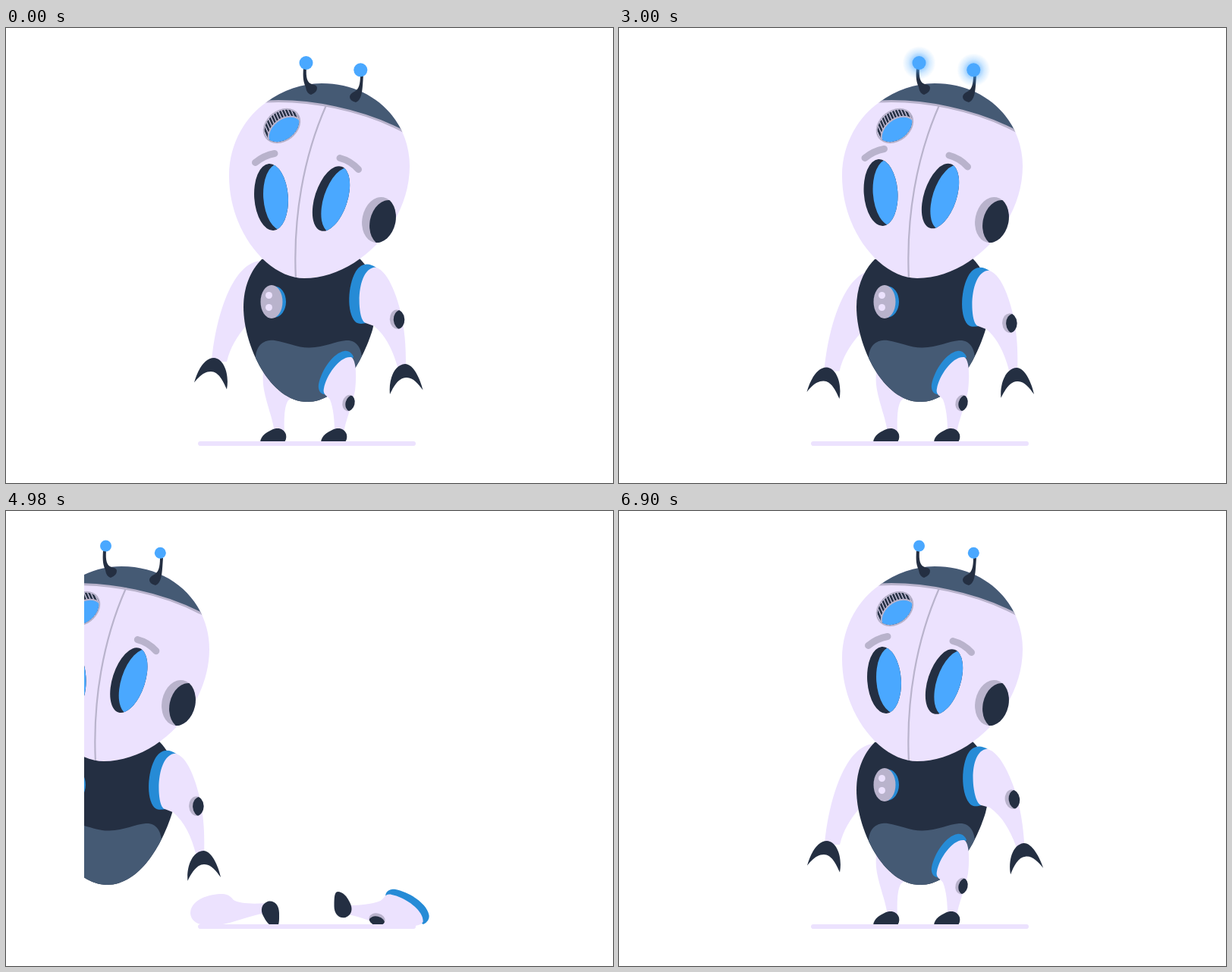
Recreate the animation shown at these times as an HTML page. Size 800 px wide and 600 px high, loop 7200 ms.

```html
<!DOCTYPE html>
<html lang="en">
<head>
<meta charset="utf-8">
<title>Robot</title>
<style>
  html, body { margin: 0; width: 100%; height: 100%; overflow: hidden; background: #fff; }
  svg { display: block; width: 800px; height: 600px; }
  .skin { fill: #ece2fe; }
  .dark { fill: #242f42; }
  .slate { fill: #455a74; }
  .grey { fill: #b9b3cc; }
  .blue { fill: #4aa8ff; }
  .deep { fill: #268bd6; }
  .line { fill: none; stroke: #b9b3cc; stroke-linecap: round; }
  #armR { transform-origin: 470px 350px; }
  #legL { transform-origin: 353px 537px; }
  #legR { transform-origin: 432px 537px; }
</style>
</head>
<body>
<svg viewBox="0 0 800 600">
  <defs>
    <path id="torso" d="M337 305C322 320 313 342 313 368C313 419 348 493 397 493C440 493 470 440 483 398C490 370 493 328 463.500 301.500L400 290Z"/>
    <path id="head" d="M416 73C483 73 532 121 532 182C532 260 462 330 393 330C345 330 294 268 294 195C294 150 318 115 343 98C365 82 390 73 416 73Z"/>
    <ellipse id="port" cx="363.500" cy="129" rx="25" ry="18.500" transform="rotate(-38 363.500 129)"/>
    <ellipse id="lensL" cx="349.500" cy="223" rx="22.300" ry="44" transform="rotate(-4 349.500 223)"/>
    <ellipse id="lensR" cx="428.500" cy="225" rx="21.500" ry="44.500" transform="rotate(18 428.500 225)"/>
    <ellipse id="ear" cx="491.500" cy="253" rx="22" ry="30.300" transform="rotate(12 491.500 253)"/>
    <ellipse id="elbow" cx="515.500" cy="384.300" rx="9.700" ry="12.800" transform="rotate(-4 515.500 384.300)"/>
    <ellipse id="knee" cx="451.500" cy="494.500" rx="8" ry="10.800" transform="rotate(14 451.500 494.500)"/>
    <path id="shoe" class="dark" d="M335 546C336 537 344 533 350 530C358 526 366 528 369 536C371 545 364 551 354 551C344 551 335 551 335 546Z"/>

    <clipPath id="window"><rect x="103" y="0" width="613" height="600"/></clipPath>
    <clipPath id="inTorso"><use href="#torso"/></clipPath>
    <clipPath id="inHead"><use href="#head"/></clipPath>
    <clipPath id="inPort"><use href="#port"/></clipPath>
    <clipPath id="inLensL"><use href="#lensL"/></clipPath>
    <clipPath id="inLensR"><use href="#lensR"/></clipPath>
    <clipPath id="inEar"><use href="#ear"/></clipPath>
    <clipPath id="inElbow"><use href="#elbow"/></clipPath>
    <clipPath id="inKnee"><use href="#knee"/></clipPath>

    <pattern id="hatch" width="4" height="10" patternUnits="userSpaceOnUse" patternTransform="rotate(-24)">
      <rect width="4" height="10" fill="#ece2fe"/>
      <rect width="2.800" height="10" fill="#242f42"/>
    </pattern>
    <radialGradient id="halo">
      <stop offset=".38" stop-color="#4aa8ff" stop-opacity=".7"/>
      <stop offset=".65" stop-color="#4aa8ff" stop-opacity=".3"/>
      <stop offset="1" stop-color="#4aa8ff" stop-opacity="0"/>
    </radialGradient>
  </defs>

  <g clip-path="url(#window)"><g class="body">
    <g id="armL">
      <path class="skin" d="M335 307C300 310 277 375 271 440L291 440C296 420 304 408 316 393L335 380Z"/>
      <path class="dark" d="M248 467.500C253 450 262 435 274 435C288 436 294.500 458 291 476.500C286 465 280 453 270 453C261 453 254 460 248 467.500Z"/>
    </g>
  </g></g>

  <g id="legL">
    <path class="skin" d="M354 534C352 515 341 490 339 470C337 447 343 435 355 434C368 434 378 448 380 470C381 482 378 487 372 491C367 498 366 515 367 534Z"/>
    <use href="#shoe"/>
  </g>

  <g clip-path="url(#window)"><g class="body">
    <use href="#torso" class="dark"/>
    <path class="slate" clip-path="url(#inTorso)" d="M329 433C331 415 343 411 354 412C372 415 385 422 400 421.500C420 421 435 413 448 412C462 411 468 422 469 434L460 500L330 500Z"/>
    <ellipse class="deep" cx="354" cy="361" rx="15" ry="20.500"/>
    <ellipse class="grey" cx="350" cy="361" rx="14.500" ry="22"/>
    <circle class="skin" cx="346.500" cy="352.500" r="4.500"/>
    <circle class="skin" cx="346.500" cy="368.500" r="4.500"/>
  </g></g>

  <g id="legR">
    <path class="deep" d="M424 483C414 485 411 477 412 470C416 450 432 428 446 426C452 425 457 430 458 434L440 450L426 478Z"/>
    <path class="skin" d="M433 534C433 515 431 500 427 490C423 484 417 484 419 475C422 458 440 432 455 434C462 438 462 460 460 478C456 500 448 515 445 534Z"/>
    <use href="#knee" class="grey"/>
    <g clip-path="url(#inKnee)"><use href="#knee" class="dark" x="4" y="0.500"/></g>
    <use href="#shoe" x="80"/>
  </g>

  <rect class="skin" x="253" y="545" width="287" height="6" rx="3"/>

  <g clip-path="url(#window)"><g class="body">
    <g id="armR">
      <path class="deep" d="M488 316C478 309 468 310 461 321C450 340 449 375 460 387C464 391 470 390 476 389Z"/>
      <path class="skin" d="M487 315.500C470 316 464 345 466 368C467 380 470 388 474 389L485 393C500 405 510 425 516 447L527 444C527 420 526 398 519 370C512 345 502 320 487 315.500Z"/>
      <use href="#elbow" class="grey"/>
      <g clip-path="url(#inElbow)"><use href="#elbow" class="dark" x="5" y="0.500"/></g>
      <path class="dark" d="M506 483C504 465 511 444 526 443C537 443 546 463 549.500 477.500C543 469 536 460 527 461C518 461 511 472 506 483Z"/>
    </g>

    <use href="#head" class="skin"/>
    <g clip-path="url(#inHead)">
      <path class="slate" d="M330 97L343 97C400 94 470 108 523 136L560 150L560 50L330 50Z"/>
      <path class="line" stroke-width="3" d="M335 97.500L343 97C400 94 470 108 523 136L530 140"/>
      <path class="line" stroke-width="2.200" d="M422 102C392 170 378 250 382 332"/>
    </g>

    <ellipse class="grey" cx="363.500" cy="129" rx="27" ry="20.500" transform="rotate(-38 363.500 129)"/>
    <g clip-path="url(#inPort)">
      <rect x="330" y="100" width="70" height="60" fill="url(#hatch)"/>
      <use href="#port" class="blue" x="5" y="9" stroke="#b9b3cc" stroke-width="2"/>
    </g>

    <g id="eyeL">
      <path class="line" stroke-width="9" d="M328.500 177.500Q340 168 354 165.500"/>
      <use href="#lensL" class="dark"/>
      <g clip-path="url(#inLensL)"><use href="#lensL" class="blue" x="12"/></g>
    </g>
    <g id="eyeR">
      <path class="line" stroke-width="9" d="M440 171.500Q454 175 464.500 186.500"/>
      <use href="#lensR" class="dark"/>
      <g clip-path="url(#inLensR)"><use href="#lensR" class="blue" x="11.500" y="2"/></g>
    </g>

    <use href="#ear" class="grey"/>
    <g clip-path="url(#inEar)"><use href="#ear" class="dark" x="10" y="4"/></g>

    <path class="dark" d="M392 52C391 66 392 71 395 78Q396 86 402 88Q410 85 410 79Q410 75 403 74C397 72 395 66 396 52Z"/>
    <path class="dark" d="M471 62C470 75 470 82 468 89Q466 96 461 98Q453 96 453 91Q453 87 459 84C465 81 467 74 467 62Z"/>
    <circle class="glow" cx="395.500" cy="46" r="22" fill="url(#halo)"/>
    <circle class="glow" cx="467.300" cy="55.300" r="22" fill="url(#halo)"/>
    <circle class="blue ball" cx="395.500" cy="46" r="9"/>
    <circle class="blue ball" cx="467.300" cy="55.300" r="9"/>
  </g></g>
</svg>
<script>
const LOOP = 7200;
const anims = [];

// Each step is [time, value, easing towards the next step].
function play(selector, prop, steps) {
  const all = [...steps];
  if (all[0][0] > 0) all.unshift([0, all[0][1]]);
  const last = all[all.length - 1];
  if (last[0] < LOOP) all.push([LOOP, last[1]]);
  const frames = all.map(([time, value, easing = 'linear']) =>
    ({ offset: time / LOOP, [prop]: value, easing }));
  document.querySelectorAll(selector).forEach(el =>
    anims.push(el.animate(frames, { duration: LOOP, iterations: Infinity })));
}

// Glow: five pulses, then off.
const pulses = Array.from({ length: 11 }, (_, i) => [i * 450, i % 2, 'ease-in-out']);
play('.glow', 'opacity', pulses);
play('.ball', 'r', [[0, '9px'], [4500, '9px'], [4500, '7.5px']]);

// Arms: sink, rise, sink and stay until the body is out of sight.
const bob = (sel, prop, up, down, end) => play(sel, prop, [
  [0, up, 'ease'], [1000, down, 'ease'], [2000, up, 'ease'],
  [3000, down], [5000, down, 'ease'], [5900, end]
]);
bob('#armL', 'translate', '0px 0px', '-0.5px 12.5px', '0px 0px');
bob('#armR', 'translate', '0px 0px', '0px 4px', '0.5px -0.7px');
bob('#armR', 'rotate', '0deg', '1.1deg', '-4.2deg');

// Gaze and brows.
const gaze = (sel, shift) => play(sel, 'translate', [
  [0, '0px 0px', 'ease'], [1000, shift],
  [4500, shift, 'ease-in-out'], [5500, '0px 0px']
]);
gaze('#eyeL', '-4.5px -6px');
gaze('#eyeR', '-5px -3.5px');

// Legs: drop apart, lie, stand up again.
const drop = (sel, prop, stand, lie, fall = 'ease') => play(sel, prop, [
  [3000, stand, fall], [4500, lie], [6000, lie, 'ease'], [6900, stand]
]);
drop('#legL', 'rotate', '0deg', '-91deg');
drop('#legL', 'translate', '0px 0px', '-7px -6px');
drop('#legR', 'rotate', '0deg', '90deg');
drop('#legR', 'translate', '0px 0px', '14.5px -18px', 'linear');

// Body: out on the left, back in from the right.
play('.body', 'translate', [
  [4500, '0px 0px', 'ease-in-out'], [5500, '-565px 0px'],
  [5500, '585px 0px', 'ease-out'], [6500, '0px 0px']
]);

// Start every part together.
const start = document.timeline.currentTime || 0;
anims.forEach(anim => { anim.startTime = start; });
</script>
</body>
</html>
```
